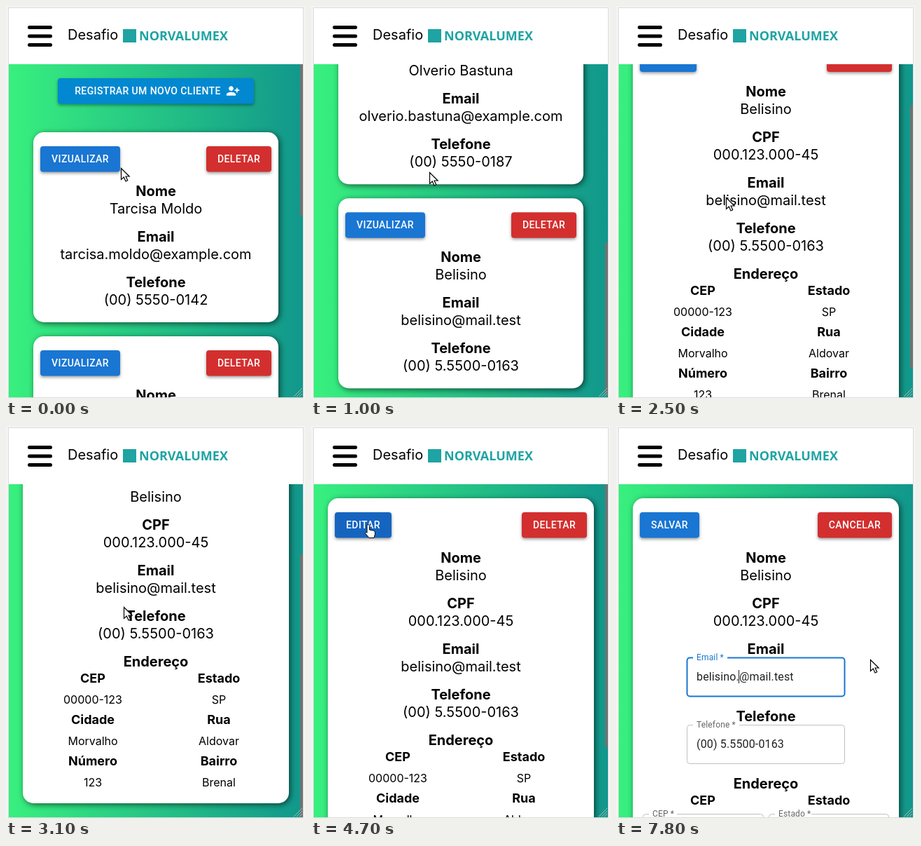
Write an HTML page that moves like this. It is 427 by 559 pixels and loops after 8 s.

```html
<!DOCTYPE html>
<html lang="pt">
<head>
<meta charset="utf-8">
<style>
html, body { margin: 0; width: 100%; height: 100%; overflow: hidden; background: #f4f4f4; }
svg { display: block; }
text { font-family: Inter, sans-serif; fill: #000; }
.mid { text-anchor: middle; }
.b { font-weight: 700; }
.btn rect { filter: drop-shadow(0 2px 2px rgba(0,0,0,.4)); }
.btn text { font: 500 14px Roboto, sans-serif; letter-spacing: .4px; fill: #fff; text-anchor: middle; }
.card { fill: #fff; filter: drop-shadow(2px 2px 4px rgba(0,0,0,.6)); }
.field text { font: 16px Roboto, sans-serif; letter-spacing: .15px; fill: #212121; }
.field .lab { font-size: 12px; fill: #666; }
.field rect { fill: none; stroke: #c0c0c0; }
</style>
</head>
<body>
<svg id="stage" width="427" height="559" viewBox="0 0 427 559"></svg>
<script>
const LOOP = 8000, STEP = 100, TOP = 83, VIEW = 475;
const BLUE = '#1976d2', RED = '#d32f2f', DARK = '#1565c0';

const people = [
  { name: 'Tarcisa Moldo', mail: 'tarcisa.moldo@example.com', tel: '(00) 5550-0142' },
  { name: 'Olverio Bastuna', mail: 'olverio.bastuna@example.com', tel: '(00) 5550-0187' },
  { name: 'Belisino', mail: 'belisino@mail.test', tel: '(00) 5.5500-0163' }
];
const client = people[2], CPF = '000.123.000-45';

const label = (s, x, y, size = 20, cls = '') =>
  `<text class="mid ${cls}" x="${x}" y="${y}" font-size="${size}">${s}</text>`;
const pair = (head, value, y) => label(head, 214, y, 20, 'b') + label(value, 214, y + 25);
const button = (s, x, y, w, fill, id = '', cx = x + w / 2) =>
  `<g class="btn"><rect id="${id}" x="${x}" y="${y}" width="${w}" height="36.5" rx="4" fill="${fill}"/>` +
  `<text x="${cx}" y="${y + 23}">${s}</text></g>`;
const card = (x, y, w, h) => `<rect class="card" x="${x}" y="${y}" width="${w}" height="${h}" rx="15"/>`;
const field = (s, value, x, y, w, gap, id = '') =>
  `<g class="field" id="${id}"><rect x="${x + .5}" y="${y + .5}" width="${w - 1}" height="55" rx="4"/>` +
  `<path d="M${x + 9} ${y + .5}h${gap}" stroke="#fff" stroke-width="4"/>` +
  `<text class="lab" x="${x + 14}" y="${y + 4}">${s} *</text>` +
  `<text class="val" x="${x + 14}" y="${y + 33}">${value}</text></g>`;

function listPage() {
  const icon = 'M13 8c0-2.21-1.79-4-4-4S5 5.79 5 8s1.79 4 4 4 4-1.79 4-4zm2 2v2h3v3h2v-3h3v-2h-3V7h-2v3h-3zM1 18v2h16v-2c0-2.66-5.33-4-8-4s-8 1.34-8 4z';
  return button('REGISTRAR UM NOVO CLIENTE', 74, 103, 280, '#0288d1', '', 202.5) +
    `<path d="${icon}" fill="#fff" transform="translate(314 111) scale(.833)"/>` +
    people.map((p, i) => {
      const y = 180 + i * 291;
      return card(39, y, 350, 271) +
        button('VIZUALIZAR', 49, y + 20, 114, BLUE, 'view' + i) +
        button('DELETAR', 286, y + 20, 93, RED) +
        pair('Nome', p.name, y + 91) + pair('Email', p.mail, y + 156) + pair('Telefone', p.tel, y + 221);
    }).join('');
}

function detailPage() {
  const rows = [['CEP', '00000-123', 'Estado', 'SP'], ['Cidade', 'Morvalho', 'Rua', 'Aldovar'],
    ['Número', '123', 'Bairro', 'Brenal']];
  return card(24, 103, 380, 547) +
    button('EDITAR', 34, 123, 81, BLUE, 'edit') + button('DELETAR', 301, 123, 93, RED) +
    pair('Nome', client.name, 195) + pair('CPF', CPF, 260) +
    pair('Email', client.mail, 325) + pair('Telefone', client.tel, 390) +
    label('Endereço', 214, 455, 20, 'b') +
    rows.map(([a, va, b, vb], i) => {
      const y = 478 + i * 59;
      return label(a, 124, y, 18, 'b') + label(va, 124, y + 30, 16) +
        label(b, 304, y, 18, 'b') + label(vb, 304, y + 30, 16);
    }).join('');
}

function formPage() {
  return card(24, 103, 380, 700) +
    button('SALVAR', 34, 123, 85, BLUE, 'save') + button('CANCELAR', 288, 123, 106, RED) +
    pair('Nome', client.name, 195) + pair('CPF', CPF, 260) +
    label('Email', 214, 325, 20, 'b') + field('Email', client.mail, 101, 330, 226, 49, 'mail') +
    label('Telefone', 214, 421, 20, 'b') + field('Telefone', client.tel, 101, 426, 226, 66) +
    label('Endereço', 214, 517, 20, 'b') +
    label('CEP', 124, 540, 18, 'b') + label('Estado', 304, 540, 18, 'b') +
    field('CEP', '', 38, 553, 173, 40) + field('Estado', '', 218, 553, 172, 52) +
    '<path id="caret" stroke="#212121"/>';
}

const stage = document.getElementById('stage');
stage.innerHTML = `
<defs>
  <linearGradient id="bg"><stop stop-color="#38f07e"/><stop offset="1" stop-color="#11978c"/></linearGradient>
  <clipPath id="clip"><rect x="4" y="${TOP}" width="420" height="${VIEW}"/></clipPath>
</defs>
<rect width="427" height="559" fill="#f4f4f4"/>
<rect x="3.5" y="2.5" width="421" height="556" fill="#fff" stroke="#dcdcdc"/>
<g clip-path="url(#clip)">
  <rect x="4" y="${TOP}" width="420" height="${VIEW}" fill="url(#bg)"/>
  <g id="list">${listPage()}</g><g id="detail">${detailPage()}</g><g id="form">${formPage()}</g>
  <rect id="thumb" x="420" width="4" fill="#6f7373"/>
</g>
<path d="M33.5 30.5h30M33.5 43h30M33.5 55.5h30" stroke="#000" stroke-width="5" stroke-linecap="round"/>
<text x="88" y="48" font-size="20">Desafio</text>
<rect x="167" y="33" width="19" height="19" fill="#1fa3a3"/>
<text x="190" y="49" style="font:700 18px 'Open Sans',sans-serif;fill:#1fa3a3">NORVALUMEX</text>
<path d="M411 557l12-12M415 557l8-8M419 557l4-4" stroke="#a9b5b3"/>
<g id="pointer">
  <path id="arrow" d="M.5 .5v16l3.8-3.5 2.7 6 2.7-1.2-2.6-5.8h5z" fill="#fff" stroke="#000" stroke-width="1.2"/>
  <path id="hand" d="M-2 1.5q0-2 1.7-2t1.7 2v5.5l6 1.2q2 .5 2 2.3v3l-1.5 5h-7l-5-6q-1.2-1.8.4-2.2l1.7 1z" fill="#fff" stroke="#000"/>
  <g id="beam" fill="none"><path d="M-4-7.5h3l1 1 1-1h3M0-7V7M-4 7.5h3l1-1 1 1h3" stroke="#fff" stroke-width="3"/>
  <path d="M-4-7.5h3l1 1 1-1h3M0-7V7M-4 7.5h3l1-1 1 1h3" stroke="#000" stroke-width="1.2"/></g>
</g>`;

const $ = id => document.getElementById(id);
const show = (id, on) => $(id).setAttribute('display', on ? 'inline' : 'none');
const set = (el, attrs) => { for (const k in attrs) el.setAttribute(k, attrs[k]); };

// Interpolates [time, ...values] keys with the given easing per span.
function track(keys, t, ease = u => u) {
  let i = 0;
  while (i < keys.length - 2 && t >= keys[i + 1][0]) i++;
  const [t0, ...a] = keys[i], [t1, ...b] = keys[i + 1];
  const u = ease(Math.min(1, Math.max(0, (t - t0) / (t1 - t0))));
  return a.map((v, k) => v + (b[k] - v) * u);
}
const easeOut = u => 1 - (1 - u) ** 3;

const scrollKeys = [[200, 0], [750, 300], [800, 300], [1100, 495], [1999, 495], [2000, 0],
  [2200, 0], [2700, 70], [2800, 70], [3100, 112], [3600, 112], [3900, 0]];
const mouseKeys = [[0, 164, 231], [100, 164, 230], [300, 164, 230], [700, 169, 237], [1200, 169, 237],
  [1800, 136, 303], [2100, 136, 303], [2700, 168, 258], [3700, 168, 258], [3900, 146, 230],
  [4400, 82, 141], [4800, 82, 141], [5100, 164, 312], [5300, 164, 312], [5800, 168, 362],
  [5900, 168, 362], [6300, 363, 333]];

function draw(time) {
  const t = Math.floor(time % LOOP / STEP) * STEP;
  const page = t < 2000 ? 'list' : t < 2100 ? '' : t < 4900 ? 'detail' : 'form';
  const [scroll] = track(scrollKeys, t, easeOut);
  const [mx, my] = track(mouseKeys, t);
  const inside = (x, y, w, h) => mx >= x && mx <= x + w && my >= y && my <= y + h;

  for (const id of ['list', 'detail', 'form']) {
    show(id, id === page);
    $(id).setAttribute('transform', `translate(0 ${-scroll})`);
  }

  const [len, max] = { list: [217, 495], detail: [375, 112], form: [285, 300] }[page] || [0, 1];
  set($('thumb'), {
    y: TOP + scroll / max * (VIEW - len), height: len,
    opacity: t < 7400 ? 1 : Math.max(0, 1 - (t - 7300) / 400)
  });

  const hover = {
    view2: page === 'list' && inside(49, 782 - scroll, 114, 36),
    edit: page === 'detail' && inside(34, 123 - scroll, 81, 36),
    save: page === 'form' && inside(34, 123, 85, 36)
  };
  for (const id in hover) $(id).setAttribute('fill', hover[id] ? DARK : BLUE);

  const over = page === 'form' && inside(101, 330, 226, 56);
  const focus = t >= 6000;
  const [box, lab] = [$('mail').querySelector('rect'), $('mail').querySelector('.lab')];
  box.style.stroke = focus ? BLUE : over ? '#212121' : '#c0c0c0';
  box.style.strokeWidth = focus ? 2 : 1;
  lab.style.fill = focus ? BLUE : '#666';

  const typed = t >= 7800, val = $('mail').querySelector('.val');
  const at = client.mail.indexOf('@');
  val.textContent = typed ? client.mail.replace('@', '.@') : client.mail;
  const blink = focus && (t < 7200 || typed);
  show('caret', blink);
  if (blink) {
    const x = Math.floor(115 + val.getSubStringLength(0, at + (typed ? 1 : 0))) + .5;
    $('caret').setAttribute('d', `M${x} 348v19`);
  }

  const hand = Object.values(hover).some(Boolean);
  show('hand', hand);
  show('beam', over && !hand);
  show('arrow', !over && !hand);
  $('pointer').setAttribute('transform', `translate(${Math.round(mx)} ${Math.round(my)})`);
}

const start = performance.now();
function tick() {
  draw(performance.now() - start);
  requestAnimationFrame(tick);
}
tick();
</script>
</body>
</html>
```
